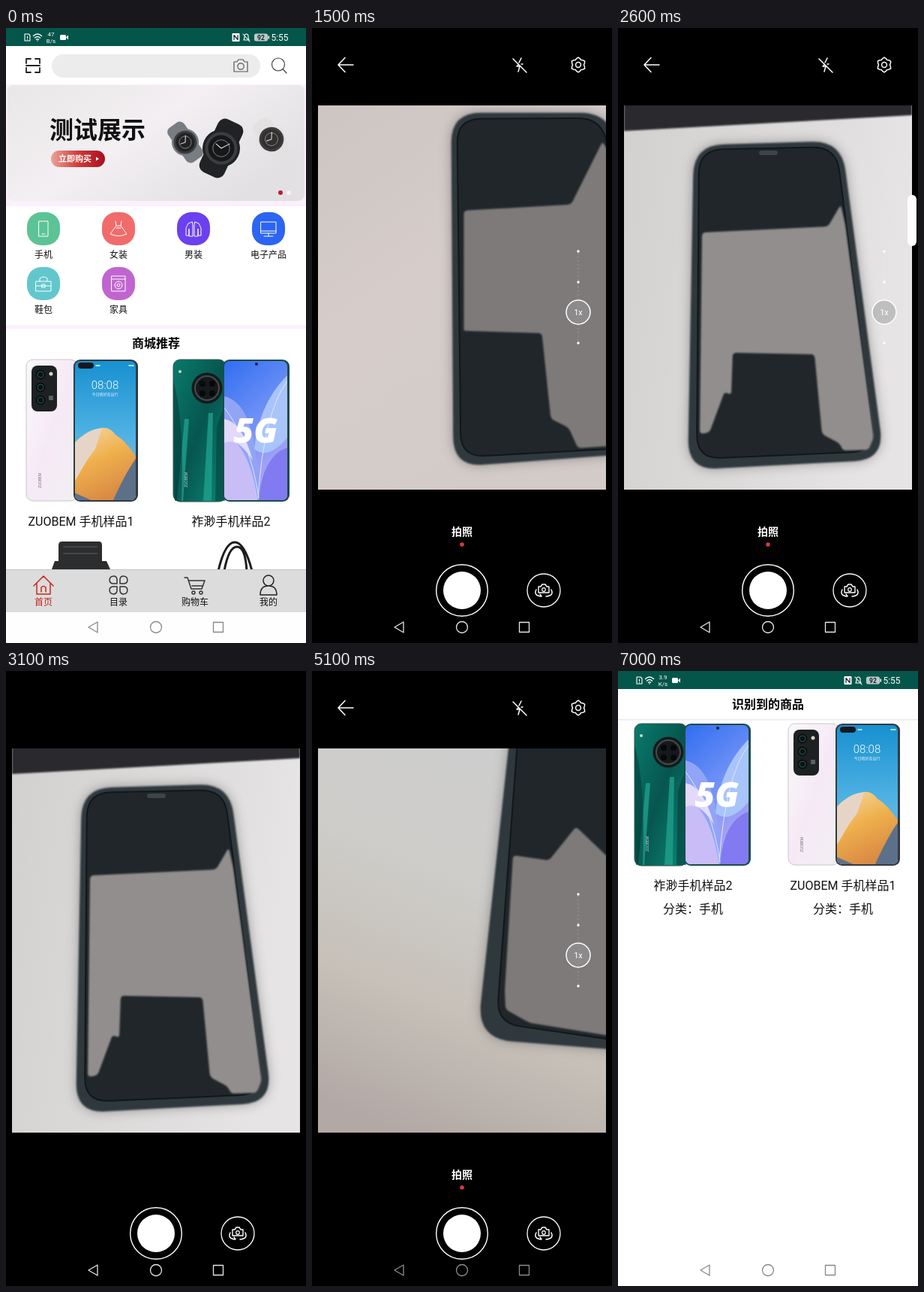
An HTML page for the animation above (7.1 s loop, 400x818 px).

```html
<!DOCTYPE html>
<html lang="zh-CN">
<head>
<meta charset="utf-8">
<title>拍照识别商品</title>
<style>
html, body { margin: 0; width: 100%; height: 100%; overflow: hidden; background: #000; }
svg { display: block; width: 400px; height: 818px; }
text { font-family: Roboto, "Noto Sans CJK SC", "Noto Sans CJK", sans-serif; text-anchor: middle; }
.line { fill: none; stroke-linecap: round; stroke-linejoin: round; }
</style>
</head>
<body>
<svg id="stage" viewBox="0 0 400 818" xmlns="http://www.w3.org/2000/svg"></svg>
<script>
const LOOP = 7100, STEP = 100, BRAND = 'ZUOBEM', BRAND_CN = '祚渺';

// Markup helpers; text is placed by its vertical centre.
const text = (x, y, s, size, fill = '#111', more = '') =>
  `<text x="${x}" y="${y + size * .36}" font-size="${size}" fill="${fill}" ${more}>${s}</text>`;
const rect = (x, y, w, h, fill, r = 0, more = '') =>
  `<rect x="${x}" y="${y}" width="${w}" height="${h}" rx="${r}" fill="${fill}" ${more}/>`;
const disc = (x, y, r, fill, more = '') => `<circle cx="${x}" cy="${y}" r="${r}" fill="${fill}" ${more}/>`;
const ring = (x, y, r, color, w = 1.2) => disc(x, y, r, 'none', `stroke="${color}" stroke-width="${w}"`);
const line = (d, color, w = 1.2, more = '') =>
  `<path class="line" d="${d}" stroke="${color}" stroke-width="${w}" ${more}/>`;
const fill = (d, color, more = '') => `<path d="${d}" fill="${color}" ${more}/>`;
const at = (x, y, s) => `<g transform="translate(${x} ${y})">${s}</g>`;
const grad = (id, dir, ...stops) => `<linearGradient id="${id}" ${dir}>${stops.map((c, i) =>
  `<stop offset="${i / (stops.length - 1)}" stop-color="${c}"/>`).join('')}</linearGradient>`;
const clip = (id, x, y, w, h, r = 0) => `<clipPath id="${id}">${rect(x, y, w, h, '#000', r)}</clipPath>`;
const nav = color => line('M122 790V804L110 797Z', color, 1.3) + ring(200, 797, 7.5, color, 1.3) +
  line('M276.5 790.5H289.5V803.5H276.5Z', color, 1.3);
const bold = 'font-weight="700"';

const defs = `<defs>
  ${grad('btn', '', '#e8a49a', '#d13a38', '#a80f22')}
  ${grad('banner', 'x2="1" y2=".6"', '#e9e7e8', '#f3eff2', '#e2e0e2')}
  ${grad('sky', 'x2="0" y2="1"', '#1790d0', '#4cb0e2', '#8ec6dc')}
  ${grad('gold', 'x2=".4" y2="1"', '#f5d9a8', '#efb04c', '#d98a45')}
  ${grad('teal', 'x2="1" y2="1"', '#0a7a6c', '#06564f', '#0b8878')}
  ${grad('petal', 'x2=".4" y2="1"', '#2f6df0', '#6c8ff6', '#b2a6f4')}
  ${grad('pearl', 'x2="1" y2="1"', '#fafafa', '#f6e9f6', '#f1f0f2')}
  ${grad('deskA', 'x2=".5" y2="1"', '#cdc5c1', '#d6cdca', '#d3cbc7')}
  ${grad('deskB', 'x2="1" y2=".2"', '#d3d0d0', '#dcd9d9', '#e6e4e5')}
  ${grad('deskC', 'x1=".6" x2=".3" y2="1"', '#cdcdcd', '#cecdca', '#c6c0b8', '#b2a8a5')}
  ${clip('view', 8, 103, 384, 511)}
  ${clip('camClip', 0, 0, 400, 818)}${clip('resClip', 0, 0, 400, 818)}
  ${clip('scr1', 92, 443, 81, 185, 7)}${clip('scr2', 291, 443, 84, 185, 7)}
  <filter id="soft"><feGaussianBlur stdDeviation="1.3"/></filter>
  <filter id="haze" x="-20%" y="-20%" width="140%" height="140%"><feGaussianBlur stdDeviation="8"/></filter>
  <g id="whitePhone">
    ${rect(27, 441, 68, 188, 'url(#pearl)', 9, 'stroke="#c9c6ca"')}
    ${rect(34, 449, 34, 61, '#1d2122', 8)}
    ${[461, 478, 495].map(y => disc(46, y, 6.5, '#0a1012') + ring(46, y, 4, '#245c50', 1)).join('')}
    ${disc(60, 460, 2.5, '#d8d4c8')}${rect(57, 489, 6, 6, '#596060', 1)}
    <g transform="rotate(-90 45 602)">${text(45, 602, BRAND, 5, '#777')}</g>
    ${rect(90, 441, 86, 189, '#343a42', 9)}
    <g clip-path="url(#scr1)">${rect(91, 442, 84, 188, 'url(#sky)')}
      ${fill('M91 552Q104 538 120 534Q136 527 146 541Q160 549 175 573V630H91Z', 'url(#gold)')}
      ${fill('M91 553Q112 531 128 533L119 560 108 575 91 604Z', '#e6d5c6')}
      ${fill('M142 630Q160 590 175 570V630ZM91 618L118 630H91Z', '#5c7189')}</g>
    ${rect(96, 445, 21, 8, '#101820', 4)}
    ${text(132, 475, '08:08', 15, '#fff', 'font-weight="300"')}
    ${text(132, 487, '今日晴好宜出行', 5, '#e4f3fa')}
    ${line('M164 449H170M120 449H125', '#dff', 1.5)}
  </g>
  <g id="tealPhone">
    ${rect(223, 441, 70, 189, 'url(#teal)', 9, 'stroke="#37554f"')}
    ${fill('M228 629L238 520 244 520 236 629ZM263 629L270 512 276 512 274 629Z', '#20a38f', 'opacity=".75"')}
    ${fill('M223 470Q238 520 234 629H225ZM281 530L292 500V629H279Z', '#043f3b', 'opacity=".6"')}
    ${disc(268, 479, 20.5, '#15191b')}${ring(268, 479, 16, '#454b4d', 2)}
    ${[[262, 473], [275, 473], [262, 486], [275, 486]].map(p => disc(...p, 4, '#05090b')).join('')}
    ${disc(232, 457, 2, '#d7d2bd')}
    <g transform="rotate(-90 240 601)">${text(240, 601, BRAND, 5, '#c3d6d2')}</g>
    ${rect(289, 441, 89, 189, '#1b4d49', 9)}
    <g clip-path="url(#scr2)">${rect(290, 442, 88, 187, 'url(#petal)')}
      ${fill('M291 490Q323 497 332 560L343 630H291Z', '#91a4f6')}
      ${fill('M375 462Q337 500 331 560Q350 575 375 545Z', '#a8c4fb')}
      ${fill('M291 540Q325 555 336 630H291Z', '#c9bdf7')}
      ${fill('M375 558Q341 570 337 630H375Z', '#817af0')}
      ${fill('M291 520Q315 524 329 575Q308 543 291 552Z', '#e2d9fb')}
      ${line('M375 470Q344 510 336 625M291 505Q326 550 337 625', '#dfe6ff', 1)}</g>
    ${text(333, 535, '5G', 46, '#fff', 'font-weight="800" font-style="italic" style="font-family:\'Open Sans\',sans-serif"')}
    ${disc(334, 447, 2, '#123')}
  </g>
</defs>`;

const watch = (x, y, r, strap, face, tilt) => `<g transform="translate(${x} ${y}) rotate(${tilt})">
  ${rect(-r * .72, -r * 1.55, r * 1.44, r * 3.1, strap, r * .4)}${disc(0, 0, r, strap)}
  ${disc(0, 0, r * .86, '#3b3e41')}${disc(0, 0, r * .7, face)}${ring(0, 0, r * .45, '#8c9194', .8)}
  ${line(`M0 0L${r * .3} ${-r * .4}M0 0L${-r * .35} ${-r * .1}`, '#e8e8e8', 1)}</g>`;

const cats = [
  ['手机', '#5cc397', 'M-6-10H6V10H-6ZM-2 7H2'],
  ['女装', '#f16b6b', 'M-4-10L-3-4H3L4-10M-3-4L-11 7Q0 12 11 7L3-4M-3-1H3'],
  ['男装', '#6b40ee', 'M-2-9L-7-7-10-1V9H-6V0V10H-1V-5ZM2-9L7-7 10-1V9H6V0V10H1V-5Z'],
  ['电子产品', '#2c64f4', 'M-10-9H10V6H-10ZM0 6V10M-6 10H6M-10 3H10'],
  ['鞋包', '#62c7cd', 'M-10-3H10V10H-10ZM-5-3V-7Q0-11 5-7V-3M-10 3H10M-2 1H2V5H-2Z'],
  ['家具', '#c065cf', 'M-9-10H9V10H-9ZM-9-6H9M-5 2A5 5 0 1 0 5 2A5 5 0 1 0-5 2M-2 2A2 2 0 1 0 2 2A2 2 0 1 0-2 2']
];
const tabs = [
  [50, '首页', '#c4281b', 'M-13 1L0-12 13 1M-9-2V12H9V-2M-3 9V3Q0 0 3 3V9'],
  [150, '目录', '#333', 'M-2-2H-8A5 5 0 1 1-2-8ZM2-2V-8A5 5 0 1 1 8-2ZM-2 2V8A5 5 0 1 1-8 2ZM2 2H8A5 5 0 1 1 2 8Z'],
  [252, '购物车', '#333', 'M-14-10H-10L-5 5H9L13-6H-8M-4 1H10M-4 10A2 2 0 1 0 0 10A2 2 0 1 0-4 10M6 10A2 2 0 1 0 10 10A2 2 0 1 0 6 10'],
  [350, '我的', '#222', 'M-7-6A7 7 0 1 0 7-6A7 7 0 1 0-7-6M-11 13Q-11 1 0 1Q11 1 11 13Z']
];

const home = `<g id="home">${rect(0, 0, 400, 818, '#fff')}${rect(0, 0, 400, 24, '#05564a')}
  <g id="homeBody">
  ${line('M27 47V41H33M39 41H45V47M45 53V59H39M33 59H27V53M27 50H45', '#222', 1.8)}
  ${rect(61, 35, 278, 31, '#ececec', 15.5)}
  ${line('M304 45H308L310 42H316L318 45H322V58H304Z', '#555')}${ring(313, 51, 4.2, '#555')}
  ${ring(363, 48.5, 8.5, '#444')}${line('M369.5 55L374 60', '#444')}
  ${rect(0, 75, 400, 162, '#fbf0fb')}${rect(2, 76, 396, 154, 'url(#banner)', 8)}
  ${text(122, 135, '测试展示', 32, '#111', bold)}
  ${rect(60, 163, 72, 22, 'url(#btn)', 11)}${text(92, 174, '立即购买', 11, '#fff', bold)}${fill('M120 171.5L124 174 120 176.5Z', '#fff')}
  ${watch(239, 152, 18, '#777d82', '#222', -35)}${watch(354, 148, 19, '#e3e1e1', '#34302f', -35)}
  ${watch(287, 160, 25, '#202225', '#16181a', 25)}
  ${disc(366, 219, 3, '#b51f35')}${disc(377, 219, 3, '#f8f2f5')}
  ${rect(0, 237, 400, 158, '#fff')}${rect(0, 395, 400, 5, '#fbf0fb')}
  ${cats.map(([s, c, d], i) => {
    const x = 50 + i % 4 * 100, y = 267 + (i > 3) * 73;
    return rect(x - 22, y - 22, 44, 44, c, 19) + at(x, y, line(d, '#fff', 1)) + text(x, y + 35, s, 12);
  }).join('')}
  ${text(200, 419, '商城推荐', 16, '#000', bold)}
  <use href="#whitePhone"/><use href="#tealPhone"/>
  ${text(100, 656, BRAND + ' 手机样品1', 16)}${text(300, 656, BRAND_CN + '手机样品2', 16)}
  ${fill('M70 688Q70 683 75 683H124Q128 683 128 688V709H134L139 720H61L65 709H70Z', '#2c2d2f')}
  ${line('M77 690H121M77 699H121', '#45474a', 2)}
  ${line('M283 722Q292 684 305 684T328 722M291 722Q297 690 308 690T321 722', '#1d1d1d', 3)}
  ${rect(0, 720, 400, 57, '#dcdcdc')}${rect(0, 720, 400, 1, '#c4c4c4')}
  ${tabs.map(([x, s, c, d]) => at(x, 741, line(d, c, 1.5)) + text(x, 763.5, s, 12, c === '#c4281b' ? c : '#111')).join('')}
  </g>${rect(0, 777, 400, 41, '#fefefe')}${nav('#888')}
  ${rect(0, 24, 400, 794, '#000', 0, 'id="homeDim"')}</g>`;

const gear = Array.from({ length: 25 }, (_, i) => {
  const a = i * Math.PI / 12, r = 8.7 + 1.2 * Math.cos(6 * a);
  return `${i ? 'L' : 'M'}${(r * Math.sin(a)).toFixed(1)} ${(r * Math.cos(a)).toFixed(1)}`;
}).join('');

const camera = `<g id="cam" clip-path="url(#camClip)">${rect(0, 0, 400, 818, '#000')}<g id="camBody">
  <g id="photo"><g clip-path="url(#view)">
    ${rect(8, 103, 384, 511, 'url(#deskA)', 0, 'id="desk"')}${rect(8, 103, 384, 511, 'url(#deskB)', 0, 'id="deskLit"')}
    <path id="strip" fill="#29292e" filter="url(#soft)"/>
    <path id="shade" fill="#50504f" opacity=".5" filter="url(#haze)"/>
    <path id="body" fill="#2d393c" filter="url(#soft)"/>
    <path id="glass" fill="#20262a" stroke="#11171a" stroke-width="2"/>
    <path id="glare" fill="#8c8988" filter="url(#soft)"/>
    ${rect(188, 163, 25, 6, '#3d4547', 3, 'id="notch"')}
  </g></g>
  <g id="zoom">${line('M355 300V416', '#fff', 1, 'stroke-dasharray="0 5" opacity=".55"')}
    ${[297, 338, 419].map(y => disc(355, y, 1.7, '#fff')).join('')}
    ${disc(355, 378, 16, '#999', 'fill-opacity=".5" stroke="#fff" stroke-width="1.5"')}${text(355, 378.5, '1x', 11, '#fff')}</g>
  <g id="tools">${line('M55 49H35M44 39.5L35 49 44 58.5', '#fff', 1.5)}
    ${line('M268 41L286 59M279 40L276 46M275 49L273 51H277L275 58M281 48H279', '#fff', 1.5)}
    ${at(355, 49, line(gear + 'Z', '#fff', 1.5) + ring(0, 0, 3.4, '#fff', 1.5))}
    ${text(200, 670, '拍照', 14, '#fff', bold)}${disc(200, 687, 2.8, '#d43b42')}</g>
  <g id="shutter">${ring(200, 748, 34.3, '#fff', 1.4)}${disc(200, 748, 25, '#fff', 'id="knob"')}
    ${ring(309, 748, 22, '#fff', 1.3)}<g id="flip">${line('M302 743H305L307 740H311L313 743H316V751H302Z', '#fff', 1.4)}${ring(309, 747, 2.3, '#fff')}
    ${line('M299 747Q295 755 306 756L304 753M319 747Q323 755 312 756', '#fff', 1.5)}</g></g>
  <g id="review">${line('M37 41L53 57M53 41L37 57', '#fff', 1.6)}${line('M344.5 48L352 55.5 366 41', '#fff', 1.6)}</g>
  ${rect(386, 222, 12, 68, '#fff', 6, 'id="handle"')}
  </g><g id="camNav">${nav('#fff')}</g></g>`;

const result = `<g id="res" clip-path="url(#resClip)">${rect(0, 0, 400, 818, '#fff')}${rect(0, 0, 400, 24, '#05564a')}
  <g id="resBody">${text(200, 44.5, '识别到的商品', 16, '#000', bold)}${rect(-200, 64, 800, 1.5, '#f3e6f3')}
  <g id="goods">${at(-201, -371, '<use href="#tealPhone"/>')}${at(200, -371, '<use href="#whitePhone"/>')}</g>
  <g id="names">${text(100, 285, BRAND_CN + '手机样品2', 16)}${text(300, 285, BRAND + ' 手机样品1', 16)}
    ${text(100, 316, '分类：手机', 16)}${text(300, 316, '分类：手机', 16)}</g></g>${nav('#888')}</g>`;

const status = `<g id="status">${line('M25 8H30L32 10V17H25ZM28.5 11V13.5M28.5 15.3V15.4', '#fff', 1.1)}
  ${line('M36.5 10.5Q42 5.5 47.5 10.5M38.5 13Q42 10 45.5 13M40.5 15.2Q42 14 43.5 15.2M42 17V17.1', '#fff', 1.4)}
  <g id="rateNum">${text(60, 8, '47', 8, '#fff')}${text(60, 17, 'B/s', 8, '#fff')}</g>
  <g id="rateLate">${text(60, 8, '3.9', 8, '#fff')}${text(60, 17, 'K/s', 8, '#fff')}</g>
  ${rect(72, 9, 8, 7, '#fff', 1.5)}${fill('M80 12.5L83 9.5V15.5Z', '#fff')}
  ${rect(301.5, 7, 10, 11, '#fff', 1)}${line('M304 15.5V9.5L309 15.5V9.5', '#123', 1.2)}
  ${line('M317 16H324L323 13V11Q323 8 320.5 8T318 11V13ZM316 8L325 18', '#fff', 1.1)}
  ${rect(331, 7.5, 18, 10, '#bccac8', 2.5)}${rect(349.5, 10.5, 1.5, 4, '#fff')}${text(340, 12.6, '92', 8.5, '#123', bold)}
  ${text(365, 12.7, '5:55', 12, '#fff')}</g>`;

document.getElementById('stage').innerHTML = defs + home + camera + result + status;

const el = id => document.getElementById(id);
const set = (id, name, v) => el(id).setAttribute(name, v);
const show = (id, on) => set(id, 'opacity', +on);
const move = (id, x, y = 0) => set(id, 'transform', `translate(${x} ${y})`);
const span = (t, a, b) => Math.min(1, Math.max(0, (t - a) / (b - a)));
const between = (t, a, b) => t >= a && t < b;
const smooth = k => k * k * (3 - 2 * k);
const slide = (t, a) => 1 - (1 - span(t, a, a + 400)) ** 1.64;

// Closed path through points with rounded corners.
function round(pts, r) {
  const n = pts.length;
  return pts.map((p, i) => {
    const toward = q => {
      const d = Math.hypot(q[0] - p[0], q[1] - p[1]) || 1, k = Math.min(.45, r / d);
      return `${p[0] + (q[0] - p[0]) * k} ${p[1] + (q[1] - p[1]) * k}`;
    };
    return `${i ? 'L' : 'M'}${toward(pts[(i + n - 1) % n])}Q${p.join(' ')} ${toward(pts[(i + 1) % n])}`;
  }).join('') + 'Z';
}

// Poses of the handset seen by the camera.
const near = {
  body: [[143, 131], [355, 131], [442, 580], [146, 602]],
  glass: [[151, 139], [344, 138], [432, 574], [156, 589]],
  glare: [[160, 261], [303, 253], [345, 169], [360, 195], [432, 560], [420, 570], [312, 577], [300, 550],
    [276, 538], [264, 424], [162, 421], [161, 421], [161, 420], [160, 420], [160, 419]],
  strip: [[8, 100], [190, 100], [190, 102], [8, 117]]
};
const whole = {
  body: [[101, 156], [298, 150], [355, 574], [93, 588]],
  glass: [[108, 162], [291, 158], [343, 563], [105, 573]],
  glare: [[112, 272], [280, 264], [297, 235], [303, 262], [341, 545], [334, 561], [300, 562], [296, 553],
    [272, 540], [262, 434], [153, 432], [151, 488], [142, 484], [122, 538], [109, 540]],
  strip: [[8, 100], [392, 100], [392, 116], [8, 137]]
};
const corner = {
  body: [[284, -100], [560, -100], [520, 513], [220, 489]],
  glass: [[287, -80], [560, -80], [520, 508], [246, 468]],
  glare: [[268, 245], [316, 252], [352, 207], [396, 249], [396, 485], [290, 468], [258, 450], [257, 425]],
  strip: [[0, 90], [8, 90], [8, 91], [0, 91]]
};
const mix = (a, b, k) => a.map((p, i) => p.map((v, j) => v + (b[i][j] - v) * k));

function drawScene(t) {
  const late = t >= 4800, k = late ? 0 : smooth(span(t, 2000, 2500));
  const drift = late ? 0 : 1 - smooth(span(t, 1200, 1900));
  const part = key => (late ? corner[key] : mix(near[key], whole[key], k))
    .map(([x, y]) => [x + 70 * drift, y - 30 * drift]);
  const body = round(part('body'), late ? 48 : 40);
  set('body', 'd', body);
  set('shade', 'd', body);
  set('glass', 'd', round(part('glass'), 32));
  set('glare', 'd', round(part('glare'), 5));
  set('glare', 'fill', late || k < .5 ? '#7e7a7a' : '#918e8d');
  set('strip', 'd', round(part('strip'), 0));
  set('desk', 'fill', late ? 'url(#deskC)' : 'url(#deskA)');
  set('deskLit', 'opacity', k);
  set('notch', 'opacity', k > .9 ? 1 : 0);
}

function draw(t) {
  const open = slide(t, 750), done = slide(t, 5200);
  move('homeBody', -80 * open);
  set('homeDim', 'opacity', .12 * open);

  const edge = 400 * (1 - open), resEdge = 400 * (1 - done);
  el('camClip').firstChild.setAttribute('x', edge);
  el('resClip').firstChild.setAttribute('x', resEdge);
  move('camBody', edge / 2 - 80 * done);
  move('resBody', resEdge / 2);

  drawScene(t);
  const review = between(t, 3400, 4800), ready = between(t, 1300, 3100) || t >= 4900;
  show('photo', t >= 1300);
  move('photo', 0, review ? 50 * smooth(span(t, 3300, 3600)) : 0);
  show('tools', ready);
  show('zoom', ready);
  show('shutter', !review);
  show('flip', t >= 1100);
  set('knob', 'r', between(t, 2900, 3100) ? 21 : 25);
  show('review', between(t, 3500, 4700));
  show('handle', between(t, 1800, 3000));
  set('camNav', 'opacity', t < 4800 ? .9 : .55);

  show('goods', t >= 6100);
  show('names', t >= 5900);
  show('status', t < 1200 || t >= 5300);
  show('rateNum', t < 5800);
  show('rateLate', t >= 5800);
}

const start = performance.now();
function tick(now) {
  const t = Math.max(0, now - start) % LOOP;
  draw(Math.floor(t / STEP) * STEP);
  requestAnimationFrame(tick);
}
draw(0);
requestAnimationFrame(tick);
</script>
</body>
</html>
```
